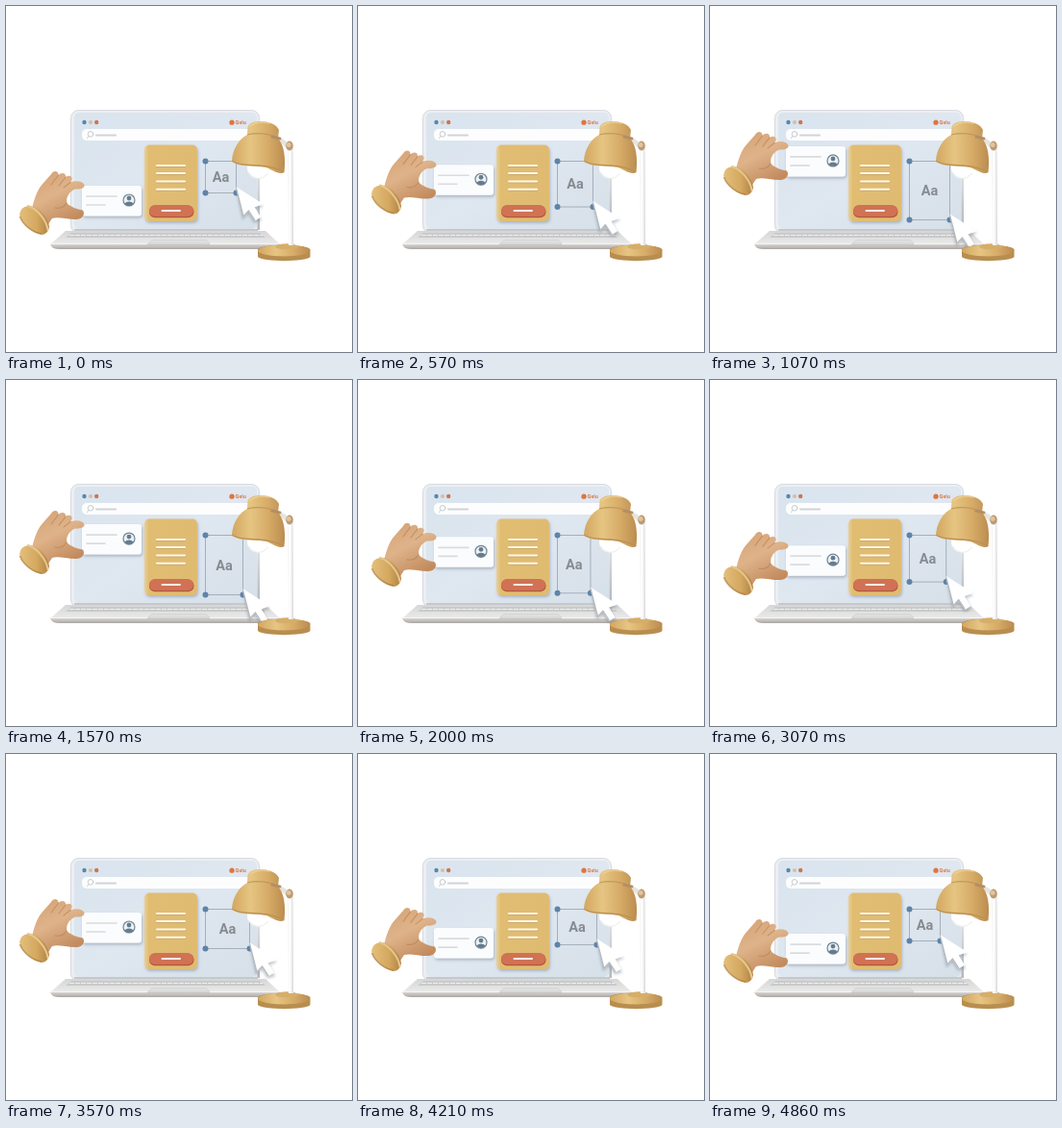
These frames come from a looping animation (360 by 360 pixels, 4930 ms). An HTML page:

```html
<!DOCTYPE html>
<html lang="en">
<head>
<meta charset="utf-8">
<title>Interface design</title>
<style>
html, body { margin: 0; width: 100%; height: 100%; overflow: hidden; background: #fff; }
svg { display: block; width: 100%; height: 100%; }
</style>
</head>
<body>
<svg viewBox="0 0 360 360">
<defs>
  <linearGradient id="screen" x1="0" y1="0" x2="1" y2="1">
    <stop offset="0" stop-color="#d9e4ee"/><stop offset=".5" stop-color="#dfe7f0"/><stop offset="1" stop-color="#d6e0e9"/>
  </linearGradient>
  <linearGradient id="panel"><stop offset="0" stop-color="#ead09a"/><stop offset=".08" stop-color="#e1bd72"/><stop offset="1" stop-color="#dfbb72"/></linearGradient>
  <linearGradient id="deck" x1="0" y1="0" x2="0" y2="1"><stop offset="0" stop-color="#d6d6d6"/><stop offset="1" stop-color="#ebebea"/></linearGradient>
  <linearGradient id="lip" x1="0" y1="0" x2="0" y2="1"><stop offset="0" stop-color="#dcdad8"/><stop offset="1" stop-color="#a9a6a3"/></linearGradient>
  <linearGradient id="edge" x1="0" y1="0" x2="0" y2="1"><stop offset="0" stop-color="#e2e4e7"/><stop offset=".6" stop-color="#c3c6ca"/><stop offset="1" stop-color="#b4b7bb"/></linearGradient>
  <linearGradient id="shade"><stop offset="0" stop-color="#d2a761"/><stop offset=".35" stop-color="#e6c582"/><stop offset=".7" stop-color="#d5aa66"/><stop offset="1" stop-color="#bb8d50"/></linearGradient>
  <linearGradient id="pole"><stop offset="0" stop-color="#f4f4f4"/><stop offset=".5" stop-color="#fff"/><stop offset="1" stop-color="#d6d6d6"/></linearGradient>
  <linearGradient id="skin" x1="0" y1="0" x2=".5" y2="1"><stop offset="0" stop-color="#d3a071"/><stop offset=".5" stop-color="#dfb38a"/><stop offset="1" stop-color="#c28b5e"/></linearGradient>
  <linearGradient id="cuff"><stop offset="0" stop-color="#e4c07c"/><stop offset=".6" stop-color="#d3a75f"/><stop offset="1" stop-color="#b08143"/></linearGradient>
  <filter id="soft" x="-30%" y="-30%" width="160%" height="170%"><feDropShadow dx="1" dy="2" stdDeviation="1.8" flood-color="#5b6a7a" flood-opacity=".38"/></filter>
  <filter id="blur" x="-50%" y="-50%" width="200%" height="200%"><feGaussianBlur stdDeviation="1.8"/></filter>
</defs>

<!-- laptop -->
<rect x="67.5" y="108.500" width="196" height="128" rx="8" fill="#eceef1" stroke="#d6d9dd"/>
<rect x="71" y="111" width="190" height="121" rx="5" fill="url(#screen)"/>
<path d="M261.500 172H264V233H261.500Z" fill="url(#edge)"/>
<path d="M71 233H262" stroke="#b9bcbf" stroke-width="1.400"/>
<path d="M62 234H270L285 248H46Z" fill="url(#deck)"/>
<path d="M68 236H264L270 241H62Z" fill="#c9cacb"/>
<path d="M66 238.500H267" stroke="#eeefef" stroke-width="1" stroke-dasharray="5 1"/>
<path d="M152 243.500H208L212 247H148Z" fill="#dfdfdf" stroke="#c8c8c8" stroke-width=".5"/>
<path d="M46 247.500H285Q284 253 276 253H56Q47 253 46 247.500Z" fill="url(#lip)"/>
<path d="M47 247.500H284" stroke="#f5f5f4" stroke-width="1"/>
<path d="M147 248H212" stroke="#bcbab8" stroke-width="1"/>
<circle cx="81.500" cy="121" r="2.200" fill="#5688aa"/>
<circle cx="88" cy="121" r="2.100" fill="#d6bcaa"/>
<circle cx="94.200" cy="121" r="2.200" fill="#c87755"/>
<circle cx="235" cy="121.200" r="2.600" fill="#de7440"/>
<text x="238.500" y="123.400" font-family="Inter, sans-serif" font-size="5" font-weight="700" fill="#de7440">Qelu</text>
<rect x="79" y="128" width="177" height="12" rx="5" fill="#fdfdfe"/>
<g fill="none" stroke="#c8ccd0" stroke-linecap="round"><circle cx="88" cy="133.300" r="2.800"/><path d="M86 135.500L84.500 137.500"/><path d="M94 134.500H114" stroke="#d2d3d4" stroke-width="2"/></g>

<!-- form -->
<g filter="url(#soft)"><rect x="144" y="144.500" width="55" height="79.500" rx="5" fill="url(#panel)"/></g>
<g stroke-width="2" stroke-linecap="round">
  <path d="M157 167H186M157 175H186M157 183.500H186M157 191.700H186" stroke="#b9975c" opacity=".5"/>
  <path d="M157 166H186M157 174H186M157 182.500H186M157 190.700H186" stroke="#fff8ec"/>
</g>
<rect x="149" y="207.800" width="46.500" height="12.400" rx="6" fill="#b0573d"/>
<rect x="149" y="207" width="46" height="12" rx="6" fill="#d07253"/>
<path d="M162.500 213H181" stroke="#fff0e6" stroke-width="2" stroke-linecap="round"/>

<!-- resizable text -->
<path id="frame" fill="none" stroke="#a3afbb" stroke-width="1"/>
<g fill="#5f83a8"><circle cx="207.500" cy="161.500" r="3"/><circle id="low" cx="207.500" r="3"/><circle id="corner" r="3"/></g>
<text id="label" text-anchor="middle" font-family="Roboto, sans-serif" font-size="14.500" font-weight="700" fill="#868b90">Aa</text>
<g id="cursor">
  <path d="M0 0L28 15L20 18L26 30L18 32L12 23L6 29Z" fill="#6f7780" opacity=".42" filter="url(#blur)"/>
  <path d="M0 -4L26 12.500L17.500 15.500L24 26L19 29L12.500 19L7.500 25Z" fill="#fff" stroke="#fff" stroke-width="1.500" stroke-linejoin="round"/>
  <path d="M-.5 -4L7 25.500L12.500 19.500L19 29.500" fill="none" stroke="#b3b9bf" stroke-width="1.300" stroke-linejoin="round"/>
</g>

<!-- contact card -->
<g id="card">
  <rect x="79" y="187" width="62" height="31.500" rx="3" fill="#fbfcfd" filter="url(#soft)"/>
  <path d="M84 198H115M84 207H103" stroke="#dadcde" stroke-width="1.700" stroke-linecap="round"/>
  <circle cx="128" cy="202" r="6" fill="#edf1f3" stroke="#6f8595" stroke-width="1.200"/>
  <circle cx="128" cy="200" r="2.400" fill="#667c8c"/>
  <path d="M123.600 206C124.500 202.700 131.500 202.700 132.400 206Q128 209.800 123.600 206Z" fill="#667c8c"/>
</g>

<g id="hand">
  <path d="M27 211C29 201 33 190 39 184L47 175C49 170.500 55 171 54.500 176C57 172.500 63 173.500 62 178C65 175.500 70 177 68.500 181L67 183.500C73 181 80 182 81.500 186C82 190 76 191 72 190.500C66 193 62 199 63.500 205C67 209 74 211.500 80 212.500C83 217 79 222 73 222C62 222 54 219 48 221L42 230Z" fill="url(#skin)"/>
  <path d="M54.500 176L47 186M62 178L55 187M67 183.500L60 189M63 205C60 210 56 211 51 210" fill="none" stroke="#b67f52" stroke-width="1.100" stroke-linecap="round" opacity=".6"/>
  <path d="M23 208C33 207 44 220 45 230Q43 238 37 238C27 236 17 227 14 217Q15 209 23 208Z" fill="url(#cuff)"/>
  <path d="M23 208C32 211 42 222 43.500 233" fill="none" stroke="#e6c68d" stroke-width="2" stroke-linecap="round"/>
  <path d="M14.500 219C18 229 29 236 37 237" fill="none" stroke="#ab7d40" stroke-width="1.600" opacity=".7"/>
</g>

<!-- lamp -->
<path d="M262 253.500C262 247 316 247 316.500 253.500V261C313 266.500 266 266.500 262 261Z" fill="#b88e50"/>
<ellipse cx="289.200" cy="254.500" rx="27" ry="6" fill="url(#shade)"/>
<ellipse cx="292" cy="250.300" rx="12" ry="3" fill="#d6ae6a"/>
<path d="M292.500 147H298.500L299 249H294Z" fill="url(#pole)"/>
<path d="M279 137Q288 136 294 143L291 147Q286 141 279 141Z" fill="#e6e4e1"/>
<circle cx="262" cy="168.500" r="11" fill="#fff"/>
<path d="M251 172Q262 186 273 174" fill="none" stroke="#ececea" stroke-width="1"/>
<path d="M235 161C236 148 243 138 251 134L251.500 126C253 117 280 118 284 129L283 138C290 145 291 160 289.500 173C284 176 278 171 271 168C258 164 244 170 235 161Z" fill="url(#shade)"/>
<path d="M251 134C262 131 276 133 283 138" fill="none" stroke="#b58b4c" stroke-width="1.200" opacity=".7"/>
<path d="M254 125Q262 119 274 122" fill="none" stroke="#ecd29a" stroke-width="1.500" stroke-linecap="round" opacity=".8"/>
<path d="M235.500 161.500C246 169 272 162 289 173" fill="none" stroke="#bb9052" stroke-width="1.400"/>
<path d="M277 136L285 138" stroke="#b48f64" stroke-width="3" stroke-linecap="round"/>
<ellipse cx="295" cy="145.500" rx="3.800" ry="5" fill="#c09a70"/>
<circle cx="294.200" cy="144.500" r="2.400" fill="#dec5a4"/>
</svg>
<script>
const LOOP = 4930, STEP = LOOP / 69, CYCLE = 4860;
const LEFT = 207.5, TOP = 161.5;
const times = [0, 1070, 1570, 2570, 3570, 4210];
const cardY = [0, -41, -37, -9, -22, -6];
const handY = [0, -41, -36, -9, -21, -12];
const boxW = [32, 42, 39, 31, 46, 41];
const boxH = [33, 61, 62, 56, 41, 37];
const [frame, low, corner, label, cursor, card, hand] =
  ['frame', 'low', 'corner', 'label', 'cursor', 'card', 'hand'].map(id => document.getElementById(id));

// Smooth periodic curve through the poses.
function curve(values, t) {
  const n = times.length;
  const at = i => times[(i + n) % n] + Math.floor(i / n) * CYCLE;
  const val = i => values[(i + n) % n];
  const slope = i => (val(i + 1) - val(i - 1)) / (at(i + 1) - at(i - 1));
  t %= CYCLE;
  let i = 0;
  while (i < n - 1 && t >= times[i + 1]) i++;
  const d = at(i + 1) - at(i), u = (t - at(i)) / d, v = 1 - u;
  return v * v * ((1 + 2 * u) * val(i) + u * d * slope(i))
    + u * u * ((1 + 2 * v) * val(i + 1) - v * d * slope(i + 1));
}

function move(el, x, y) {
  el.setAttribute('transform', `translate(${x.toFixed(2)} ${y.toFixed(2)})`);
}

function draw(ms) {
  const t = Math.min(68, Math.floor((ms % LOOP + 5) / STEP)) * STEP;
  const w = curve(boxW, t), h = curve(boxH, t);
  const x = LEFT + w, y = TOP + h;
  frame.setAttribute('d', `M${LEFT} ${TOP}H${x}V${y}H${LEFT}Z`);
  low.setAttribute('cy', y);
  move(corner, x, y);
  move(label, LEFT + w / 2, TOP + h / 2 + 5.2);
  move(cursor, x + .5, y - 1);
  move(card, 0, curve(cardY, t));
  move(hand, 0, curve(handY, t));
}

const start = performance.now();
function tick() {
  draw(performance.now() - start);
  requestAnimationFrame(tick);
}
tick();
</script>
</body>
</html>
```
